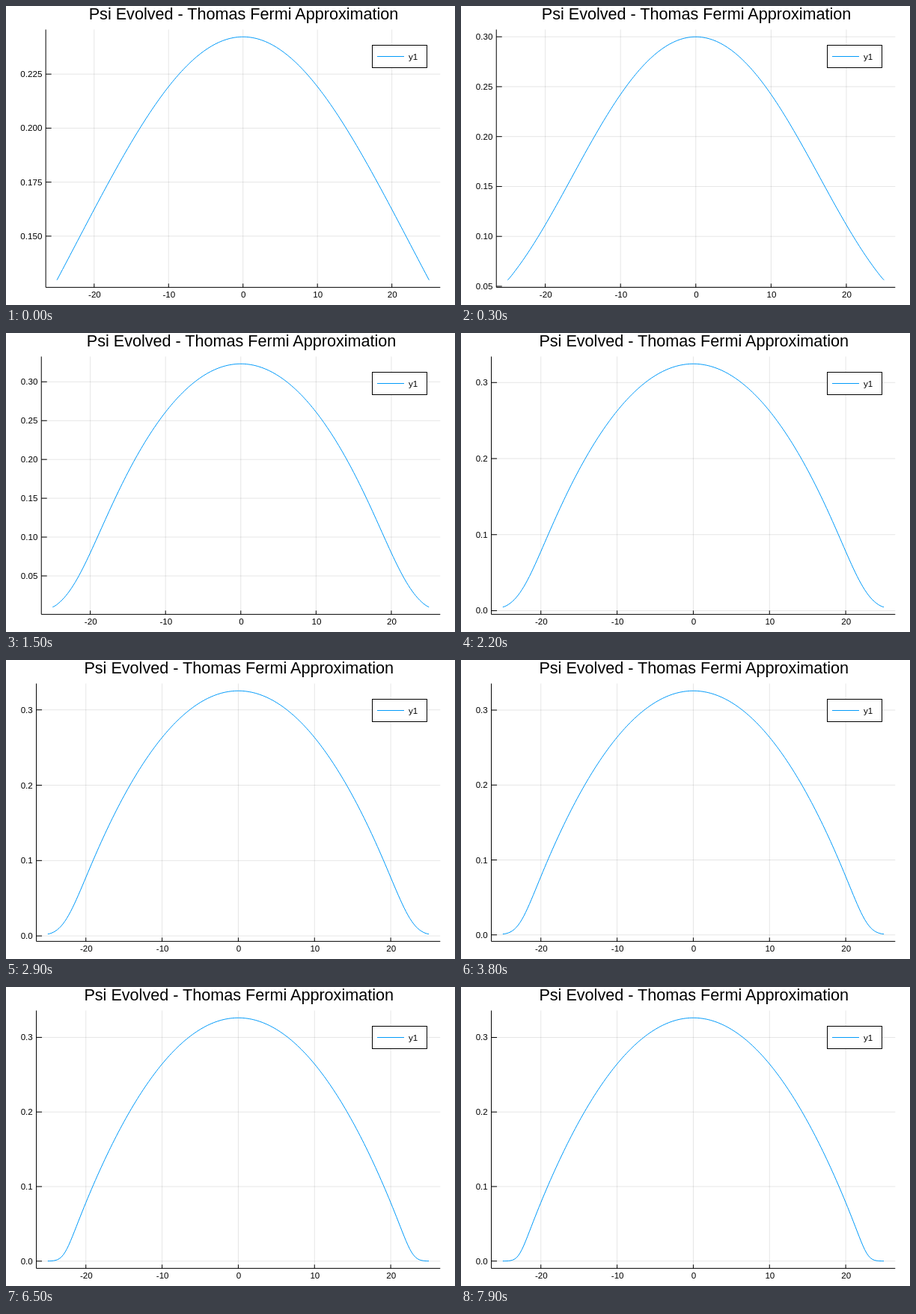
Recreate the animation shown at these times as an HTML page. Size 600 by 400 pixels, loop 8000 ms.

```html
<!DOCTYPE html>
<html lang="en">
<head>
<meta charset="utf-8">
<title>Psi Evolved</title>
<style>
  html, body { margin: 0; width: 100%; height: 100%; overflow: hidden; background: #fff; }
  svg { display: block; width: 600px; height: 400px; }
  text { font: 11.6px "Liberation Sans", Arial, sans-serif; fill: #000; }
  #title { font-size: 21.6px; text-anchor: middle; }
  .line { fill: none; stroke: #009afa; }
  #grid { stroke: #000; stroke-opacity: .1; }
  #axes { fill: none; stroke: #000; }
</style>
</head>
<body>
<svg viewBox="0 0 600 400">
  <rect width="600" height="400" fill="#fff"/>
  <path id="grid"/>
  <path id="axes"/>
  <g id="labels"></g>
  <path id="curve" class="line"/>
  <text id="title" y="18">Psi Evolved - Thomas Fermi Approximation</text>
  <rect x="489.5" y="52.5" width="73" height="30" fill="#fff" stroke="#000"/>
  <path class="line" d="M496 67.5H532"/>
  <text x="538" y="72">y1</text>
</svg>
<script>
const FRAME_MS = 100, FRAMES = 80;
const TOP = 31.5, BOTTOM = 376.38, RIGHT = 580.3;
const PAD = 0.03;
const HALF = 25, DX = 0.25;
const el = id => document.getElementById(id);

// Imaginary-time relaxation of a trapped condensate, one step per frame.
function evolve() {
  const dt = 0.1, coupling = 8.08, omega = 0.1, atoms = 10, diffusion = 0.04;
  const spread = diffusion * dt / DX ** 2;
  const xs = Array.from({ length: 2 * HALF / DX + 1 }, (_, i) => i * DX - HALF);

  const normalise = psi => {
    const ends = (psi[0] ** 2 + psi.at(-1) ** 2) / 2;
    const sum = psi.reduce((total, p) => total + p * p, -ends);
    const k = Math.sqrt(atoms / (sum * DX));
    return psi.map(p => p * k);
  };
  const diffuse = psi => psi.map((p, i) =>
    p + spread * ((psi[i - 1] ?? p) - 2 * p + (psi[i + 1] ?? p)));
  const relax = psi => psi.map((p, i) =>
    p * Math.exp(-dt * (0.5 * (omega * xs[i]) ** 2 + coupling * p * p)));

  let psi = normalise(xs.map(x => Math.exp(-x * x / 2000)));
  return Array.from({ length: FRAMES }, () => {
    const density = psi.map(p => p * p);
    psi = normalise(diffuse(relax(psi)));
    return density;
  });
}

// Tick spacing, decimals and the left edge that leaves room for the labels.
function tickStyle(range, lowest) {
  if (range < 0.15) return { step: 0.025, digits: 3, left: 53.15 };
  if (lowest > 0) return { step: 0.05, digits: 2, left: 47.24 };
  return { step: 0.1, digits: 1, left: 40.55 };
}

const label = (text, x, y, anchor) =>
  `<text x="${x}" y="${y}" text-anchor="${anchor}">${text}</text>`;

function draw(density) {
  const max = Math.max(...density), min = Math.min(...density);
  const range = max - min;
  const low = min - PAD * range, high = max + PAD * range;
  const { step, digits, left } = tickStyle(range, low);
  const span = 2 * HALF * (1 + 2 * PAD);
  const toX = x => left + (x / span + 0.5) * (RIGHT - left);
  const toY = y => BOTTOM - (y - low) / (high - low) * (BOTTOM - TOP);

  let grid = "", labels = "";
  let axes = `M${left} ${TOP}V${BOTTOM}H${RIGHT}`;

  for (let x = -20; x <= 20; x += 10) {
    const px = toX(x);
    grid += `M${px} ${TOP}V${BOTTOM}`;
    axes += `M${px} ${BOTTOM}v-5`;
    labels += label(x, px + 0.6, 390, "middle");
  }
  for (let n = Math.ceil(low / step); n * step <= high; n++) {
    const py = toY(n * step);
    grid += `M${left} ${py}H${RIGHT}`;
    axes += `M${left} ${py}h7.5`;
    labels += label((n * step).toFixed(digits), left - 4.8, py + 4, "end");
  }

  const points = density.map((y, i) =>
    `${toX(i * DX - HALF).toFixed(2)} ${toY(y).toFixed(2)}`);
  el("grid").setAttribute("d", grid);
  el("axes").setAttribute("d", axes);
  el("labels").innerHTML = labels;
  el("curve").setAttribute("d", "M" + points.join("L"));
  el("title").setAttribute("x", (left + RIGHT) / 2 + 0.8);
}

const densities = evolve();
const start = performance.now();
let shown = -1;

function tick() {
  const frame = Math.floor((performance.now() - start) / FRAME_MS) % FRAMES;
  if (frame !== shown) draw(densities[shown = frame]);
  requestAnimationFrame(tick);
}
tick();
</script>
</body>
</html>
```
